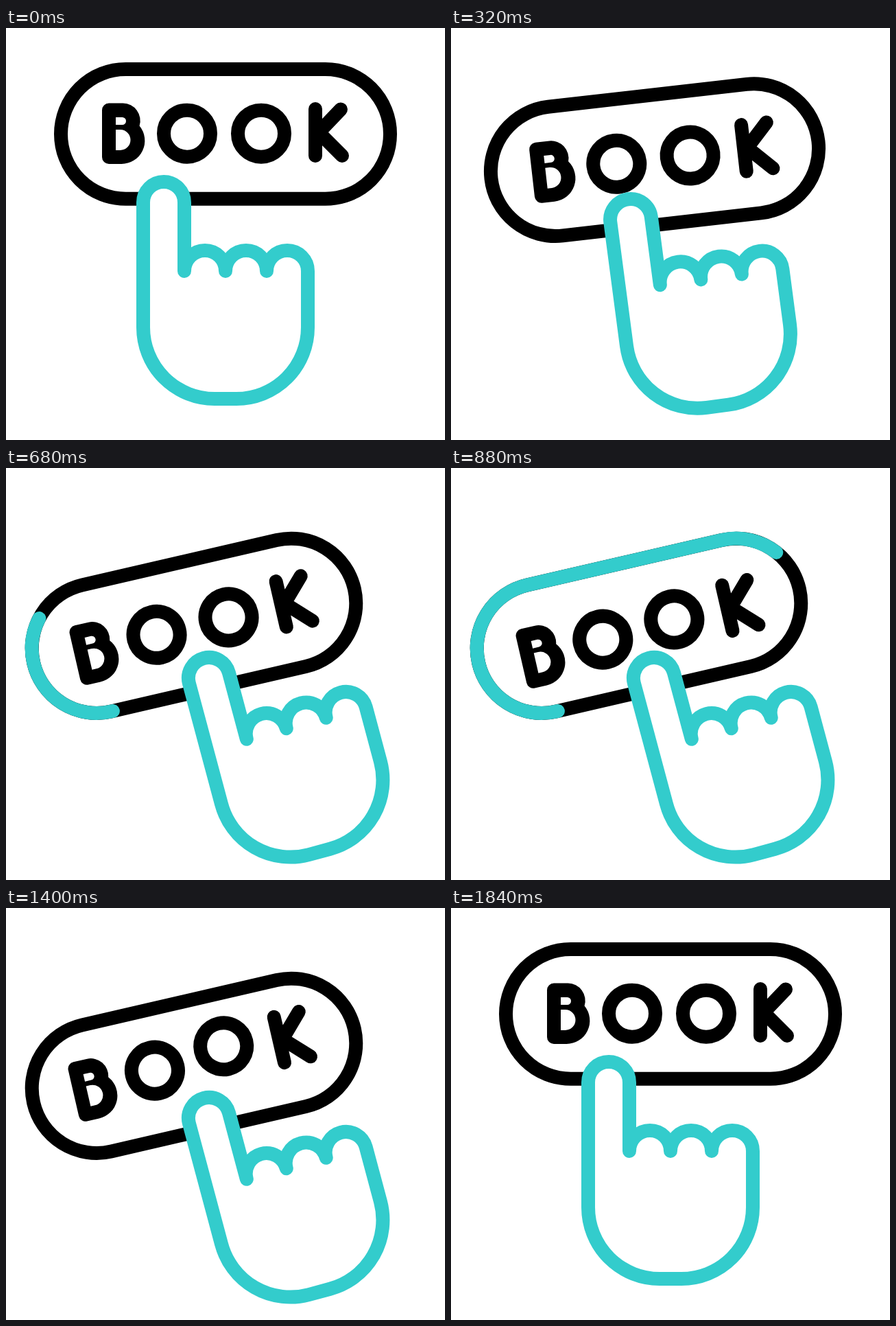
Recreate the animation shown at these times as an HTML page. Size 640 by 600 pixels, loop 2000 ms.

```html
<!DOCTYPE html>
<html lang="en">
<head>
<meta charset="utf-8">
<title>Book button</title>
<style>
  html, body { margin: 0; width: 100%; height: 100%; overflow: hidden; background: #fff; }
  svg { display: block; width: 640px; height: 600px; }
  .line { fill: none; stroke: #000; stroke-width: 20; stroke-linecap: round; stroke-linejoin: round; }
  .teal { stroke: #33cccc; }
  #hand { fill: #fff; }
</style>
</head>
<body>
<svg viewBox="0 0 640 600" role="img" aria-label="BOOK">
  <g id="button">
    <rect class="line" x="80" y="60" width="480" height="188.8" rx="94.4"/>
    <path id="trace" class="line teal" pathLength="1"
      d="M177 248.8H174.4A94.4 94.4 0 0 1 174.4 60H465.6A94.4 94.4 0 0 1 465.6 248.8H177"/>
    <path class="letter" fill-rule="evenodd"
      d="M150 109.5H170.5A25.5 25.5 0 0 1 194.6 142.4A34 34 0 0 1 168 198H150A10 10 0 0 1 140 188V119.5A10 10 0 0 1 150 109.5Z
         M160 130V141H169.5A5.5 5.5 0 0 0 169.5 130Z
         M160 148V178H166.5A15 15 0 0 0 166.5 148Z"/>
    <circle class="letter line" cx="264" cy="153.7" r="34"/>
    <circle class="letter line" cx="372" cy="153.7" r="34"/>
    <path class="letter line" d="M451 118V186M488 118.5L455 153M490 186L455 151"/>
  </g>
  <path id="hand" class="line teal"
    d="M260 354V254A30 30 0 0 0 200 254V436A104 104 0 0 0 304 540H336A104 104 0 0 0 440 436V354
       A30 30 0 0 0 380 354A30 30 0 0 0 320 354A30 30 0 0 0 260 354Z"/>
</svg>
<script>
const LOOP = 2000, STEP = 40;
const button = document.getElementById('button');
const hand = document.getElementById('hand');
const trace = document.getElementById('trace');
const letters = document.querySelectorAll('.letter');

// Each letter dips, hops up, then settles; delay is in steps.
const hops = [
  { delay: 0, low: [1.7, 10.6], high: [-3.5, -17.4] },
  { delay: 3, low: [0.2, 10.5], high: [-3.6, -17.4] },
  { delay: 6, low: [0.5, 8.6],  high: [-3.5, -17.4] },
  { delay: 4, low: [0.5, 9.6],  high: [-2.2, -10.4] }
];

// Eased progress from step a to step b.
function ease(n, a, b) {
  const t = Math.min(1, Math.max(0, (n - a) / (b - a)));
  return t * t * (3 - 2 * t);
}

const mix = (a, b, k) => a + (b - a) * k;

// Turn and shift a shape about its own centre.
function pose(el, x, y, dx, dy, angle) {
  el.setAttribute('transform',
    `translate(${x + dx} ${y + dy}) rotate(${angle}) translate(${-x} ${-y})`);
}

function hopOffset(n, { delay, low, high }) {
  const s = n - delay;
  const dip = ease(s, 12, 22), rise = ease(s, 22, 29), fall = ease(s, 29, 33.8);
  return [0, 1].map(i => mix(mix(low[i] * dip, high[i], rise), 0, fall));
}

function draw(ms) {
  const n = Math.floor((ms % LOOP) / STEP);
  const k = ease(n, 4, 12) - ease(n, 35.5, 45.4);

  pose(button, 320, 154.4, -46 * k, 75.4 * k, -13 * k);
  pose(hand, 320, 382, 96 * k, 24.3 * k, -15 * k);

  letters.forEach((el, i) => {
    const [x, y] = hopOffset(n, hops[i]);
    el.setAttribute('transform', `translate(${x} ${y})`);
  });

  const head = ease(n, 12, 30.2), tail = ease(n, 22, 34);
  trace.style.display = head > tail ? '' : 'none';
  trace.setAttribute('stroke-dasharray', `${head - tail} 2`);
  trace.setAttribute('stroke-dashoffset', -tail);
}

const start = performance.now();
function tick() {
  draw(performance.now() - start);
  requestAnimationFrame(tick);
}
draw(0);
requestAnimationFrame(tick);
</script>
</body>
</html>
```
